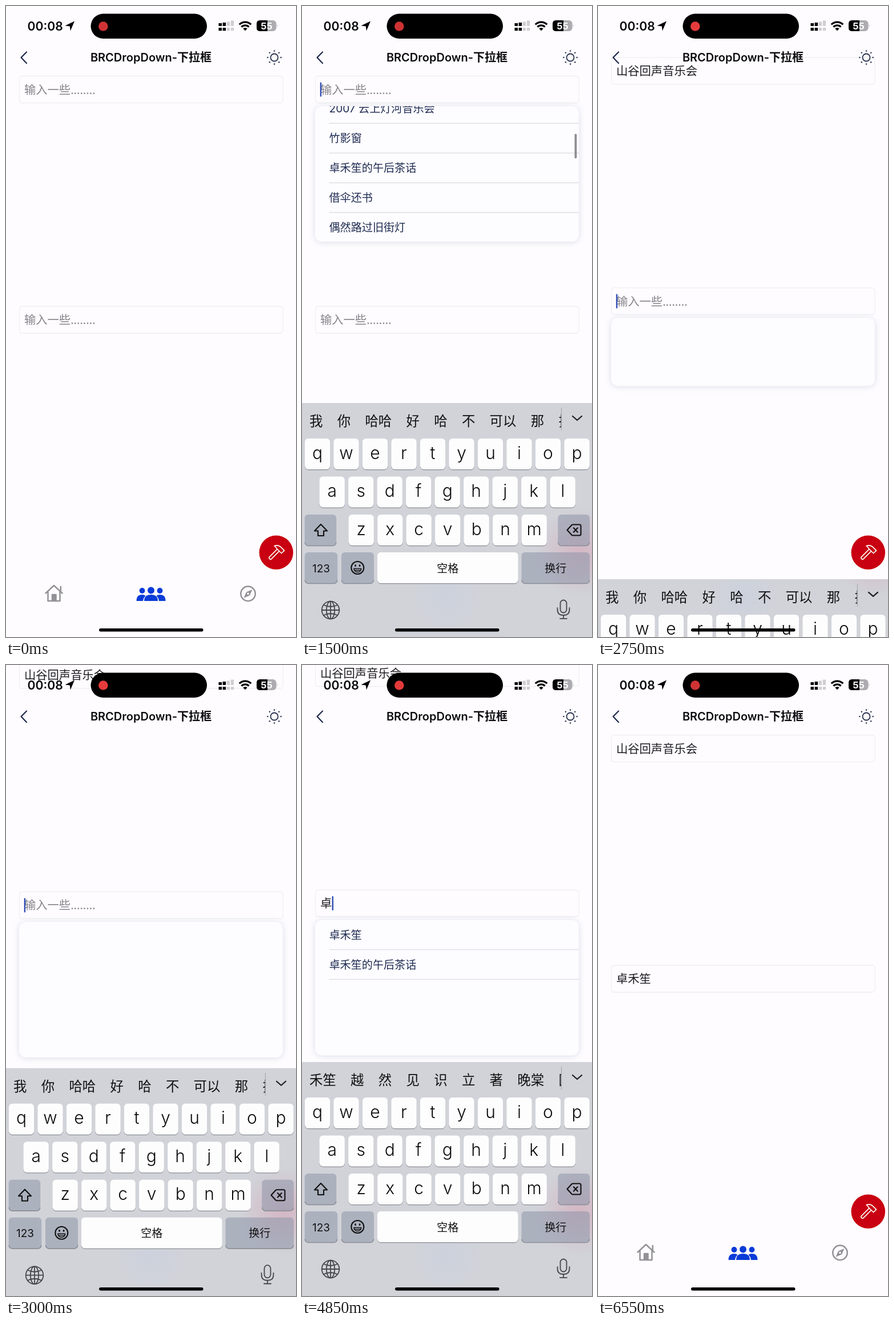
An HTML page that plays this animation: 508 px wide and 1103 px high, repeating every 6.6 s.

```html
<!DOCTYPE html>
<html lang="zh-CN">
<head>
<meta charset="utf-8">
<title>BRCDropDown</title>
<style>
html, body { margin: 0; width: 100%; height: 100%; overflow: hidden; background: #fefcfe; }
svg { display: block; width: 100%; height: 100%; }
text { font-family: Inter, "Noto Sans CJK SC", "Noto Sans CJK", sans-serif; white-space: pre; }
.line { fill: none; stroke-linecap: round; stroke-linejoin: round; }
.mid { text-anchor: middle; }
.field { fill: #fefcfe; stroke: #efeef0; stroke-width: 1.3; }
.input { font-size: 20.3px; fill: #1c1b20; }
.input.hint { fill: #858389; font-family: "Noto Sans", "Noto Sans CJK SC", "Noto Sans CJK", sans-serif; }
.row { font-size: 19.1px; fill: #1f2c52; }
.word { font-size: 23.4px; fill: #111; }
.key { font-size: 30px; font-weight: 300; fill: #0b0b0d; }
.label { font-size: 19px; fill: #111; }
#sheet { fill: #fdfcfe; filter: drop-shadow(0 1px 6px rgba(150, 170, 195, .34)); }
</style>
</head>
<body>
<svg viewBox="0 0 508 1103">
  <defs>
    <clipPath id="sheetClip"><rect id="sheetMask" width="462" rx="12"/></clipPath>
    <clipPath id="boardClip"><rect width="508" height="409"/></clipPath>
    <clipPath id="wordClip"><rect width="455" height="60"/></clipPath>
    <radialGradient id="pink"><stop stop-color="#d98aa2" stop-opacity=".38"/><stop offset=".45" stop-color="#d98aa2" stop-opacity=".22"/><stop offset="1" stop-color="#d98aa2" stop-opacity="0"/></radialGradient>
    <radialGradient id="blue"><stop stop-color="#b5c8ee" stop-opacity=".18"/><stop offset="1" stop-color="#b5c8ee" stop-opacity="0"/></radialGradient>
  </defs>
  <rect width="508" height="1103" fill="#fefcfe"/>

  <g id="tabs">
    <g class="line" stroke="#929196" stroke-width="2.5">
      <path d="M69.5 1026.500L84 1013l14.500 13.500M73.500 1024v16h21v-16M95.800 1015v8"/>
      <path d="M81 1029h6.500v10.500H81z" fill="#929196"/>
      <circle cx="424" cy="1027.300" r="12.700"/>
    </g>
    <path d="M431.500 1020l-4.500 10.200-10.500 4.500 4.500-10.300z" fill="#929196"/>
    <circle cx="424" cy="1027.300" r="1.800" fill="#fefcfe"/>
    <g fill="#0a3bd8">
      <circle cx="238.500" cy="1022" r="4.900"/><circle cx="269.500" cy="1022" r="4.900"/>
      <path d="M228.500 1040q0-11 10-11 4 0 6 2-4 3.500-4.500 9zM279.500 1040q0-11-10-11-4 0-6 2 4 3.500 4.500 9z"/>
      <circle cx="254" cy="1021.500" r="6"/><path d="M242 1040q0-11 12-11t12 11z"/>
    </g>
    <circle cx="473.300" cy="955.300" r="29.800" fill="#c90011"/>
    <g class="line" stroke="#fff" stroke-width="1.600" transform="translate(473 955) rotate(45)">
      <path d="M-10-6q3-6.500 10-6.500h8v7H3-3q-4-1-7-.500zM-2.500-5.500V14q0 2 2.500 2t2.500-2V-5.500"/>
    </g>
  </g>

  <g id="page">
    <rect class="field" x="23.500" y="122.500" width="461.500" height="47" rx="5"/>
    <text class="input" id="text0" x="32" y="153.500"></text>
    <rect class="field" x="23.500" y="525" width="461.500" height="47" rx="5"/>
    <text class="input" id="text1" x="32" y="556"></text>
    <rect id="caret" width="2.400" height="25" rx="1" fill="#2f4cb4"/>
    <g id="panel">
      <rect id="sheet" width="462" rx="12"/>
      <g clip-path="url(#sheetClip)">
        <g id="full"></g>
        <g id="matches"></g>
        <rect id="bar" x="454.500" width="3.800" height="43" rx="1.900" fill="#8e8d92"/>
      </g>
    </g>
  </g>

  <g id="nav">
    <path class="line" d="M36 80.500L26.500 90l9.500 10" stroke="#1f294c" stroke-width="2.200"/>
    <text class="mid" x="254" y="97" font-size="20" font-weight="600" fill="#0c0c10">BRCDropDown-下拉框</text>
    <circle cx="470" cy="90" r="6.500" fill="none" stroke="#28324f" stroke-width="1.800"/>
    <g id="rays" fill="#28324f"></g>
  </g>

  <g id="status">
    <text x="37.500" y="42.700" font-size="21.200" font-weight="600" fill="#08080a">00:08</text>
    <path d="M120 26.500l-16.500 8 8.300 1 1 8z"/>
    <rect x="148.500" y="13.500" width="203.500" height="43.500" rx="21.700"/>
    <circle id="rec" cx="170.300" cy="35.500" r="8.300"/>
    <path d="M372.500 38h5.500v5.300h-5.500zM379.600 38h5.500v5.300h-5.500zM372.500 30h5.500v5h-5.500zM379.600 29h5.500v6h-5.500z"/>
    <path d="M386.700 38h5.300v5.300h-5.300zM393.800 38h5.300v5.300h-5.300zM386.700 27.500h5.300V35h-5.300zM393.800 25.500h5.300V35h-5.300z" fill="#cfced1"/>
    <g fill="none" stroke="#000" stroke-width="3.300">
      <path d="M408.800 32.300a14.500 14.500 0 0 1 20.400 0M412.500 36.600a9.200 9.200 0 0 1 13 0"/>
    </g>
    <path d="M415.300 39.600a5.300 5.300 0 0 1 7.400 0l-3.700 3.700z"/>
    <rect x="439" y="25" width="34.500" height="19" rx="6" fill="#adacb0"/>
    <path d="M458 25v19h-13q-6 0-6-6v-7q0-6 6-6z"/>
    <path d="M474.500 32q2 2.500 0 5z" fill="#adacb0"/>
    <text class="mid" x="456.500" y="40.500" font-size="16.500" font-weight="700" fill="#fff">55</text>
  </g>

  <g id="board">
    <rect width="508" height="409" fill="#d1d3d9"/>
    <g clip-path="url(#boardClip)"><g id="tint">
      <circle cx="486" cy="955" r="78" fill="url(#pink)"/>
      <circle cx="254" cy="1032" r="60" fill="url(#blue)"/>
    </g></g>
    <g id="words">
      <g id="wordList" clip-path="url(#wordClip)"></g>
      <path d="M454.500 8v40" stroke="#a9abb1" stroke-width="1.300"/>
      <path class="line" d="M474 23l8 7 8-7" stroke="#1c1c1e" stroke-width="2.200"/>
    </g>
    <g id="keys"></g>
    <g class="line" stroke="#111" stroke-width="2.100">
      <path d="M33 212l11 11.500h-6v8.500H28v-8.500h-6z"/>
      <path d="M464.500 222l8-8.800q.8-.7 2-.7h11.500q2.500 0 2.500 2.500v14q0 2.500-2.500 2.500h-11.500q-1.200 0-2-.7zM475.800 218.300l7 7.400M482.800 218.300l-7 7.400"/>
      <circle cx="97.300" cy="288" r="11"/>
      <path d="M90.800 289.500h13q-1 6-6.500 6t-6.500-6z" stroke-width="1.500"/>
      <path d="M91.500 292.500h11.600" stroke-width="1.300"/>
      <path d="M93.500 283.500v1.300M101.100 283.500v1.300" stroke-width="2.600"/>
    </g>
    <g class="line" stroke="#45464b" stroke-width="1.800">
      <circle cx="50" cy="362" r="15.300"/><ellipse cx="50" cy="362" rx="7.200" ry="15.300"/>
      <path d="M34.700 362h30.600M50 346.700v30.600M38 353q12 6 24 0M38 371q12-6 24 0"/>
      <rect x="452.500" y="344.500" width="11" height="22" rx="5.500"/>
      <path d="M447.500 358v3q0 10 10.500 10t10.500-10v-3M458 371v5.500M452 376.800h12"/>
    </g>
  </g>
  <rect x="163" y="1088" width="182.500" height="5.500" rx="2.750"/>
</svg>

<script>
const LOOP = 6600, HINT = '输入一些........';
const OPEN = [485, 2699], CLOSE = [2271, 5450], PICK = [2240, 5420];
const ROW = 52, ROWS = 27, SHEET = 237, BOARD = 409;
const items = ['卓禾笙', '木梯上的猫', '半盏凉茶', '北巷邮差', '旧毛衣口袋', '2007 云上灯河音乐会',
  '竹影窗', '卓禾笙的午后茶话', '借伞还书', '偶然路过旧街灯', '晾衣绳上的云', '蓝瓷碗',
  '五楼西窗', '山谷回声音乐会', '纸鸢谷', '半圆规', '折角的信笺'];
const common = '我 你 哈哈 好 哈 不 可以 那 把';
// time, text in the second field, suggestions
const typing = [
  [0, '', common],
  [3500, 'z', '在 中 这 做 走 再 只 最 怎 着'],
  [3700, 'zh', '中 这 只 着 找 住 种 真 张 直'],
  [3900, 'zhu', '住 主 注 祝 猪 竹 诸 煮 助 珠'],
  [4120, 'zhuo', '桌 捉 着 卓 灼 拙 啄 浊 琢 茁'],
  [4500, '卓', '禾笙 越 然 见 识 立 著 晚棠 国']
];

const $ = id => document.getElementById(id);
function add(parent, tag, attrs, text) {
  const node = document.createElementNS('http://www.w3.org/2000/svg', tag);
  for (const k in attrs) node.setAttribute(k, attrs[k]);
  if (text) node.textContent = text;
  return parent.appendChild(node);
}
const move = (id, x, y) => $(id).setAttribute('transform', `translate(${x} ${y})`);
const show = (id, on) => $(id).setAttribute('opacity', +on);
const clamp = x => Math.min(1, Math.max(0, x));
const easeOut = x => 1 - (1 - clamp(x)) ** 3;
function spring(ms) {
  const w = Math.max(0, ms) * .01826;
  return 1 - (1 + w) * Math.exp(-w);
}

function addRows(parent, names) {
  names.forEach((name, i) => {
    add(parent, 'text', { class: 'row', x: 24.5, y: i * ROW + 33.2 }, name);
    add(parent, 'path', { d: `M24.500 ${(i + 1) * ROW}H462`, stroke: '#e1e0e4', 'stroke-width': 1.3 });
  });
}
function addKey(x, y, w, text, cls, dark) {
  const keys = $('keys');
  const edge = `M${x + .5} ${y + 48.5}a6 6 0 0 0 6 6h${w - 13}a6 6 0 0 0 6-6`;
  add(keys, 'path', { d: edge, fill: 'none', stroke: '#8b8d93', 'stroke-width': 1.7 });
  add(keys, 'rect', { x, y, width: w, height: 54, rx: 6, fill: dark ? '#8e95aa' : '#fefdfe', 'fill-opacity': dark ? .55 : 1 });
  if (text) add(keys, 'text', { class: 'mid ' + cls, x: x + w / 2, y: y + (cls == 'key' ? 35.5 : 34.6) }, text);
}

addRows($('full'), items);
addRows($('matches'), items.filter(name => name.startsWith('卓')));
[['qwertyuiop', 5, 62], ['asdfghjkl', 30.7, 128.5], ['zxcvbnm', 81.7, 195]].forEach(([letters, x, y]) =>
  [...letters].forEach((c, i) => addKey(x + i * 50.5, y, 44, c, 'key')));
addKey(4.7, 195, 55.5, '', '', true);
addKey(448.3, 195, 55.7, '', '', true);
addKey(4.7, 261, 57.5, '123', 'label', true);
addKey(69, 261, 57, '', '', true);
addKey(132, 261, 246.5, '空格', 'label');
addKey(384.5, 261, 119.5, '换行', 'label', true);
for (let i = 0; i < 8; i++) {
  const a = i * Math.PI / 4;
  add($('rays'), 'circle', { cx: 470 + 11.6 * Math.cos(a), cy: 90 + 11.6 * Math.sin(a), r: 1.25 });
}

function setInput(id, text) {
  const node = $(id), value = text || HINT;
  if (node.textContent === value) return;
  node.textContent = value;
  node.classList.toggle('hint', !text);
}
let shownWords;
function setWords(words) {
  if (words === shownWords) return;
  shownWords = words;
  $('wordList').textContent = '';
  let x = 13;
  for (const word of words.split(' ')) {
    add($('wordList'), 'text', { class: 'word', x, y: 40 }, word);
    x += word.length * 23.4 + 25.3;
  }
}

function render(t) {
  const n = t < OPEN[1] ? 0 : 1;
  const open = t - OPEN[n], closing = t - CLOSE[n];
  const edit = typing.filter(e => e[0] <= t).pop();

  // keyboard, with the page lifted for the lower field
  const up = OPEN.reduce((sum, o, i) => sum + spring(t - o) - spring(t - CLOSE[i]), 0);
  const top = 1103 - BOARD * up;
  move('board', 0, top);
  move('tint', 0, -top);
  move('page', 0, -132 * (spring(t - OPEN[1]) - spring(t - CLOSE[1])));
  show('words', t < PICK[n]);
  setWords(edit[2]);

  setInput('text0', t < PICK[0] ? '' : items[13]);
  setInput('text1', t < PICK[1] ? edit[1] : items[0]);

  const typed = n && edit[1];
  const since = t - Math.max(OPEN[n], edit[0]);
  show('caret', open >= 0 && t < PICK[n] && since % 950 < 540);
  move('caret', typed ? 32.3 + $('text1').getComputedTextLength() : 31.7, n ? 536 : 133.5);

  // drop-down
  const h = SHEET * easeOut(open / 250);
  $('sheet').setAttribute('height', h);
  $('sheetMask').setAttribute('height', h);
  move('panel', 23, n ? 577.5 : 175);
  show('panel', open > 0 ? 1 - clamp(closing / 200) : 0);
  const scroll = n ? 0 : 301 * easeOut((t - 1200) / 500) + 327 * easeOut((t - 1750) / 400);
  move('full', 0, -scroll);
  show('full', open > 350 && !typed);
  show('matches', typed === '卓');
  $('bar').setAttribute('y', 3 + 188 * scroll / (ROW * ROWS - SHEET));
  show('bar', n ? 0 : clamp((t - 1200) / 100));

  const glow = .5 + .5 * Math.cos((t - 700) / 2200 * 2 * Math.PI);
  $('rec').setAttribute('fill', `rgb(${198 + 34 * glow},${48 + 11 * glow},${50 + 10 * glow})`);
}

const start = performance.now();
function tick() {
  render((performance.now() - start) % LOOP);
  requestAnimationFrame(tick);
}
tick();
</script>
</body>
</html>
```
